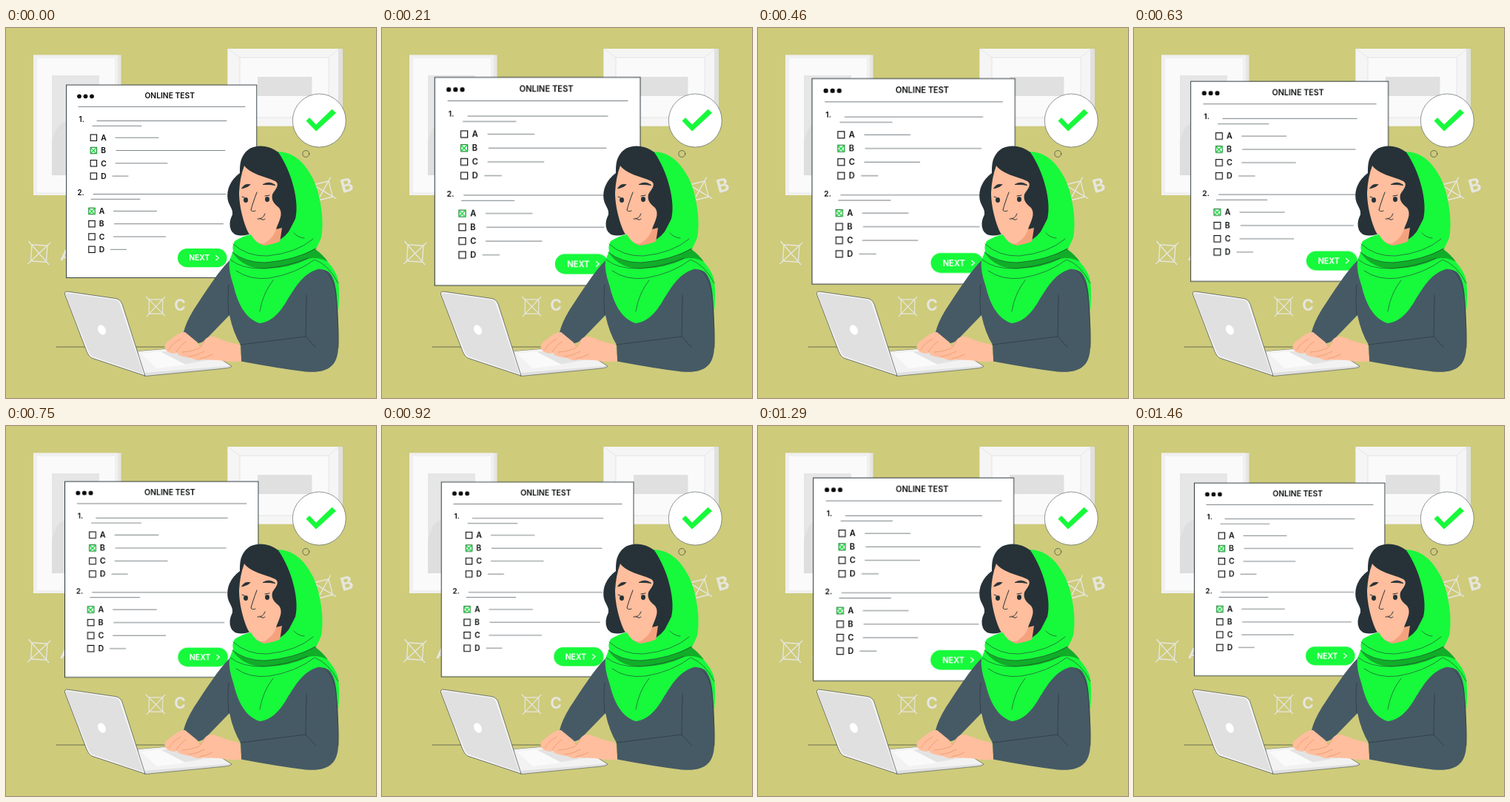
Recreate the animation shown at these times as an HTML page. Size 500 by 500 pixels, loop 1500 ms.

```html
<!DOCTYPE html>
<html lang="en">
<head>
<meta charset="utf-8">
<title>Online test</title>
<style>
  html, body { margin: 0; width: 100%; height: 100%; overflow: hidden; background: #cecb7b; }
  svg { display: block; width: 100vw; height: 100vh; }
  text { font-family: Inter, "Open Sans", sans-serif; font-weight: 600; }
  #card { transform-origin: 210.2px 207.4px; }
  .ink { fill: none; stroke: #263238; stroke-width: .6; stroke-linecap: round; stroke-linejoin: round; }
  .pale { fill: none; stroke: #e6e6df; stroke-width: 1.4; stroke-linecap: round; }
  .letter { fill: #e6e6df; font-weight: 700; text-anchor: middle; }
  .print { fill: #0a0c0d; }
  .green { fill: #17f93b; }
  .dark { fill: #263238; }
  .skin { fill: #ffbe9d; }
  .cloth { fill: #465a65; }
</style>
</head>
<body>
<svg viewBox="0 0 500 500">
  <defs>
    <g id="cross" class="pale">
      <rect x="-10.5" y="-11" width="21" height="22"/>
      <path d="M-15-15L14 14M14-15L-14 15"/>
    </g>
  </defs>
  <rect width="500" height="500" fill="#cecb7b"/>

  <g id="pictures">
    <rect x="37" y="36.5" width="118.5" height="189.5" fill="#e6e6e6"/>
    <rect x="37" y="36.5" width="114" height="189.5" fill="#f0f0f0"/>
    <rect x="42" y="41" width="105" height="181" fill="#fafafa"/>
    <rect x="62" y="64" width="64" height="135" fill="#e6e6e6"/>
    <path d="M62 199V155Q66 132 81 126Q100 119 126 150V199Z" fill="#dedede"/>
    <rect x="299.500" y="28" width="155.500" height="104.500" fill="#e0e0e0"/>
    <rect x="299.500" y="28" width="149.500" height="104.500" fill="#f5f5f5"/>
    <rect x="316" y="40" width="120" height="81" fill="#fafafa"/>
    <path d="M300 28.500L316 40H436L449 28.500M436 40V121H316V40M436 121L449 132" fill="none" stroke="#e0e0e0" stroke-width=".8"/>
    <rect x="340" y="66" width="73.500" height="26" fill="#e0e0e0"/>
  </g>

  <use href="#cross" transform="translate(44.700 304.500) rotate(4)"/>
  <use href="#cross" transform="translate(202.500 376.500) scale(.88)"/>
  <use href="#cross" transform="translate(428.500 220) rotate(-14)"/>
  <text class="letter" font-size="20" transform="translate(81 307.500) rotate(6)" y="7">A</text>
  <text class="letter" font-size="21" x="235" y="382">C</text>
  <text class="letter" font-size="25" transform="translate(460.500 212.500) rotate(-15)" y="9">B</text>

  <path class="ink" d="M68 431H240"/>

  <g id="card">
    <rect x="81.500" y="77" width="257.300" height="260.500" fill="#fff" stroke="#263238" stroke-width=".9"/>
    <g class="print">
      <circle cx="99" cy="92.300" r="2.900"/><circle cx="107.500" cy="92.300" r="2.900"/><circle cx="116" cy="92.300" r="2.900"/>
      <text x="221.200" y="95.400" font-size="10.300" text-anchor="middle">ONLINE TEST</text>
      <text x="98.500" y="126.500" font-size="9.800">1.</text>
      <text x="96.500" y="226.300" font-size="9.800">2.</text>
    </g>
    <path class="ink" d="M98 106.400H323M123 125.500H298M117 132.300H183M118 224.500H297M115 231.300H181"/>
    <g id="options"></g>
    <rect class="green" x="232" y="298" width="66.500" height="25.300" rx="12.650"/>
    <text x="261.300" y="314.300" font-size="10.300" fill="#fff" text-anchor="middle" style="font-weight:700">NEXT</text>
    <path d="M283.300 307.300L287.300 310.700L283.300 314" fill="none" stroke="#fff" stroke-width="1.200"/>
  </g>

  <g id="bubble">
    <circle cx="423.300" cy="125" r="36" fill="#fff" stroke="#263238" stroke-width=".5"/>
    <path class="green" d="M405.500 125.500L410 121L419 130.500L440.500 109.800L446 114.800L419 139.500Z"/>
    <circle class="ink" cx="405.300" cy="170" r="4.500"/>
  </g>

  <g id="laptop" stroke-linejoin="round">
    <path d="M178 437L262 430L305 457Q304 459 296 460L188 470.500L180 464Z" fill="#e0e0e0" stroke="#263238" stroke-width=".5"/>
    <path d="M178 437L262 430L303 456.500L187 466Z" fill="#f2f2f2"/>
    <path d="M184 442L244 433L283 447L226 457Z" fill="#e3e3e3"/>
    <path d="M182 440L208 437L243 455L204 460Z" fill="#fafafa"/>
    <path d="M79.500 360Q78.500 355.500 84 356.200L148 365.500Q154.500 366.500 157 373L188 470L116 446Q111.500 444 109 437Z" fill="#f5f5f5" stroke="#263238" stroke-width=".6"/>
    <path d="M80.500 361Q79.500 357.800 84 358.300L147 367.300Q152 368 154 373L185.500 467.500L117 444Q113.500 442 111 436Z" fill="#e0e0e0"/>
    <ellipse cx="129.500" cy="408" rx="5" ry="7" transform="rotate(-27 129.500 408)" fill="#fff"/>
  </g>

  <g id="woman">
    <path class="green" d="M366 167C388 167 403 181 414 202C426 226 430 262 426 283Q422 294 416 300Q447 322 449.500 345Q451 365 449 382L400 360L355 300Z"/>

    <path class="cloth" d="M303 313C286 330 270 356 254 380Q243 398 240 411Q242 422 256 426Q264 427 270 421L302 388Q307 412 317 428L318 450.500Q368 460 405 464.500C436 467 448 456 449 432Q450 400 447 365C446 342 440 326 424 323L360 320Z"/>
    <path class="ink" d="M301 347Q299 366 301 388M316 428L405 417L406 361M405 417L418 431M429 326Q446 338 447 372Q450 417 449 432"/>

    <path class="skin" d="M242 411L259 425L263 433Q252 437 240 437L226 440Q216 438 215 433Q213 429 218 424L230 415Q236 411 242 411Z"/>
    <path class="skin" d="M316 428L318 450.500Q302 452 288 449L265 448Q260 451 250 446Q236 444 232 441Q231 436 239 437Q247 437 260 433L269 421Q274 415 284 418Q297 424 316 428Z"/>
    <path d="M220 435Q226 425 236 420M230 438Q235 429 243 424M238 438Q249 438 261 433L268 424M247 444Q258 443 268 437M262 447Q272 445 279 441" fill="none" stroke="#eb996f" stroke-width=".8" stroke-linecap="round"/>

    <path class="dark" d="M368 168C352 156 331 157 322 170C316 178 316 187 316 196C303 206 298 218 299.500 231C301 240 307 244 306 252Q300 264 304 273Q309 284 328 279L369 287Q386 276 391 258C397 235 386 194 368 168Z"/>
    <path d="M340 278L373 270L370 290Q352 297 336 291Z" fill="#f3a27d"/>
    <path class="skin" d="M322 186C331 198 349 200 364 207C371 212 363 219 360 225C358 233 363 238 369 243C375 251 369 261 366 269Q363 283 349 291C337 293 328 281 323 266C318 251 315 236 315 222Q316 202 322 186Z"/>
    <g class="dark">
      <ellipse cx="324" cy="232.500" rx="3" ry="3.400"/>
      <ellipse cx="353" cy="231.500" rx="3" ry="3.400"/>
      <path d="M318.500 217Q322 210 330 211.500Q328 214.500 318.500 217ZM347 211.500Q356 206 364 212.500Q356 211 347 211.500Z" stroke="#263238" stroke-width=".8"/>
    </g>
    <path class="ink" stroke="#263238" style="stroke-width:1" d="M339 222Q333 238 331 246Q333 249 337 247M340 258Q347 259 350 251M319 228L322 229M350 227L356 226M343 257Q347 261 350 258"/>

    <path class="green" d="M309 288Q320 281 331 279Q337 291 349 294Q370 291 378 283L391 258L425 283Q422 296 416 301Q438 315 449 340Q434 324 421 326C400 333 391 351 381 366Q364 397 343 399C323 393 313 371 308 350Q300 327 302 314Q305 306 307 301Q305 295 309 288Z"/>
    <path d="M306 303Q321 316 347 317Q388 315 417 298Q429 307 435 316Q422 309 409 312Q377 327 343 325Q318 322 306 303Z" fill="#11ad28"/>
    <path class="ink" d="M307 292Q326 309 353 308Q393 304 415 285M306 303Q323 317 350 317Q390 314 419 298M303 313Q319 326 349 325Q383 322 408 311M311 328Q329 341 356 338Q392 332 417 313Q436 320 449 345M343 383Q347 358 361 341M389 277Q394 283 403 284"/>
  </g>
</svg>
<script>
  const NS = 'http://www.w3.org/2000/svg';
  const options = document.getElementById('options');

  function add(tag, attrs, text = '') {
    const el = document.createElementNS(NS, tag);
    for (const key in attrs) el.setAttribute(key, attrs[key]);
    el.textContent = text;
    options.append(el);
  }

  // One row of a question: box, letter, answer line.
  function option(letter, x, y, from, to, ticked) {
    add('rect', {
      x: x - 4.2, y: y - 4.2, width: 8.4, height: 8.4, fill: '#fff',
      stroke: ticked ? '#1c7a35' : '#0a0c0d', 'stroke-width': 1.1
    });
    if (ticked) {
      add('path', {
        d: `M${x - 4} ${y - 3.5}L${x + 4} ${y + 4.5}M${x + 4} ${y - 4}L${x - 4} ${y + 4}`,
        fill: 'none', stroke: '#17e03b', 'stroke-width': 1.4
      });
    }
    add('text', { x: x + 9.8, y: y + 3.7, 'font-size': 10.3, class: 'print' }, letter);
    add('path', { d: `M${from} ${y}H${to}`, class: 'ink' });
  }

  const ends = [[148, 206], [149, 296], [148, 218], [144, 165]];
  [[118.4, 148.2, 1, 0], [116, 247.4, 0, -2.5]].forEach(([x, y, tick, shift]) => {
    ends.forEach(([a, b], i) =>
      option('ABCD'[i], x, y + i * 17.3, a + shift, b + shift, i === tick));
  });

  // Two linear beats per loop, shown at 24 pictures per second.
  const LOOP = 1500, COUNT = 36;
  const beat = [[0, 1], [262, 1.1], [840, 1], [890, 1], [1160, 1.1], [1440, 1], [LOOP, 1]];

  function scaleAt(t) {
    const i = beat.findIndex(([end]) => end > t);
    const [t0, s0] = beat[i - 1], [t1, s1] = beat[i];
    return s0 + (s1 - s0) * (t - t0) / (t1 - t0);
  }

  const frames = Array.from({ length: COUNT }, (_, i) => {
    const t = i * LOOP / COUNT;
    return {
      offset: Math.round(t / 10) * 10 / LOOP,
      transform: `scale(${scaleAt(t)})`,
      easing: 'step-end'
    };
  });
  frames.push({ offset: 1, transform: 'scale(1)' });

  document.getElementById('card').animate(frames, { duration: LOOP, iterations: Infinity });
</script>
</body>
</html>
```
